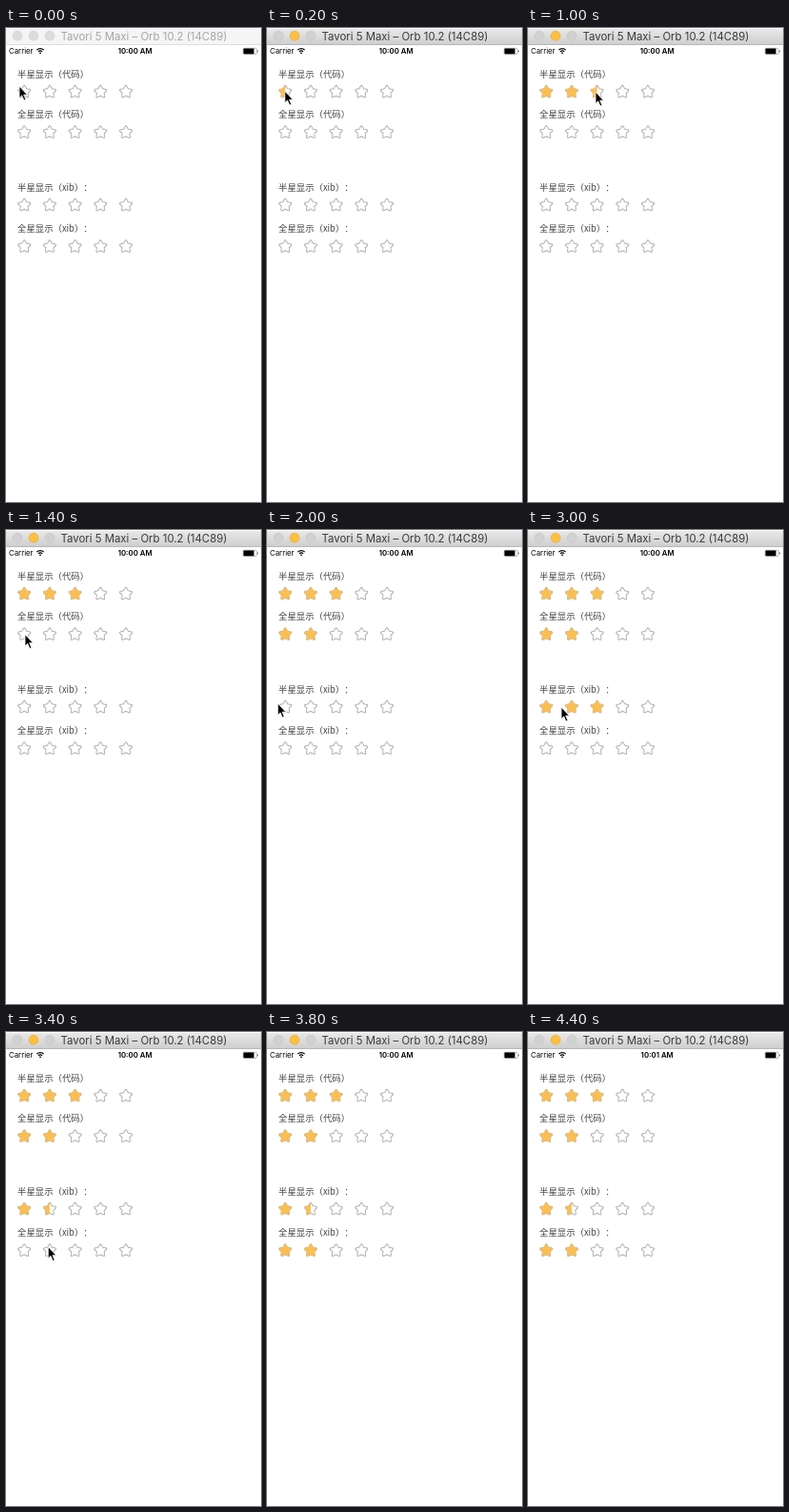
Recreate the animation shown at these times as an HTML page. Size 268x498 px, loop 4.8 s.

```html
<!DOCTYPE html>
<html lang="zh-CN">
<head>
<meta charset="utf-8">
<title>Star rating</title>
<style>
  html, body { margin: 0; width: 100%; height: 100%; overflow: hidden; background: #fff; }
  svg { display: block; width: 268px; height: 498px; }
  text { font-family: Inter, Roboto, sans-serif; }
  .title { font-size: 11.4px; text-anchor: middle; }
  .label { font: 300 9.4px "Noto Sans CJK SC", "Noto Sans CJK", sans-serif; fill: #444; text-spacing-trim: space-all; }
  .status { font-size: 7.8px; }
</style>
</head>
<body>
<svg viewBox="0 0 268 498">
  <defs>
    <linearGradient id="bar" x2="0" y2="1">
      <stop stop-color="#e9e8e9"/><stop offset="1" stop-color="#d0cfd0"/>
    </linearGradient>
    <clipPath id="left"><rect x="-9" y="-9" width="9" height="18"/></clipPath>
  </defs>
  <rect width="268" height="498" fill="#fff"/>
  <rect id="top" y="1" width="268" height="16"/>
  <rect id="edge" y="17" width="268" height="1"/>
  <g id="lights" stroke-width=".6">
    <circle cx="12" cy="8.2" r="5"/><circle cx="29" cy="8.2" r="5"/><circle cx="46" cy="8.2" r="5"/>
  </g>
  <text class="title" id="title" x="145" y="12.8">Tavori 5 Maxi – Orb 10.2 (14C89)</text>

  <text class="status" x="3" y="27.3">Carrier</text>
  <g fill="none" stroke="#000" stroke-width="1.2">
    <path d="M32.3 23.2a5.2 5.2 0 0 1 7.4 0M33.9 24.9a3 3 0 0 1 4.2 0"/>
    <path d="M36 27.4l-1.2-1.3a1.7 1.7 0 0 1 2.4 0z" fill="#000" stroke="none"/>
  </g>
  <text class="status" id="clock" x="135.7" y="27.3" font-weight="600" text-anchor="middle"></text>
  <rect x="249.3" y="21.3" width="14" height="6.2" rx="1" fill="none" stroke="#777" stroke-width=".5"/>
  <rect x="249.6" y="21.6" width="11" height="5.6" rx=".6"/>
  <path d="M264 23.2a1.3 1.3 0 0 1 0 2.4z" fill="#444"/>

  <g id="rows"></g>
  <path id="cursor" d="M0 0V12.3L2.7 9.7L4.9 14.8L6.9 14L4.7 9H8.5Z" stroke="#fff" stroke-width=".8" stroke-linejoin="round"/>
</svg>
<script>
const LOOP = 4800, STEP = 200, EXIT = 18, CLOCK = 22;
const $ = id => document.getElementById(id);

// from: first step with the pointer on this row; lift: how far above it enters;
// path: pointer x at each step; rates: rating at each step, the last one stays
const ROWS = [
  { label: "半星显示（代码）", y: 67.2, from: 0, lift: 6,
    path: [14, 18.8, 36, 71, 61, 71, 56], rates: [0, .5, .5, 1, 1, 2.5, 3] },
  { label: "全星显示（代码）", y: 109.7, from: 7, lift: 0,
    path: [20, 21, 42], rates: [0, 1, 1, 2] },
  { label: "半星显示（xib）：", y: 186.2, from: 10, lift: 4,
    path: [11.3, 19.5, 58, 63.5, 68, 35], rates: [0, .5, .5, 2, 3, 3, 1.5] },
  { label: "全星显示（xib）：", y: 229.7, from: 16, lift: 27,
    path: [57, 44.3], rates: [0, 0, 2] }
];

const points = Array.from({ length: 10 }, (_, i) => {
  const a = i * Math.PI / 5, r = i % 2 ? 3.3 : 6.1;
  return `${(r * Math.sin(a)).toFixed(2)},${(-r * Math.cos(a)).toFixed(2)}`;
}).join(" ");
const star = (color, width, extra = "") =>
  `<polygon points="${points}" fill="${color}" stroke="${color}" stroke-width="${width}" stroke-linejoin="round" ${extra}/>`;

$("rows").innerHTML = ROWS.map(({ label, y }) =>
  `<text class="label" x="12" y="${y - 15.3}">${label}</text>` +
  [0, 1, 2, 3, 4].map(i =>
    `<g transform="translate(${19.2 + i * 26.7} ${y})">${star("#a9a9a9", 2.5)}${star("#fff", .7)}${star("#f9bf55", 1.9, 'class="fill"')}</g>`
  ).join("")).join("");
const fills = [...document.querySelectorAll(".fill")];

function setWindow(active) {
  $("top").setAttribute("fill", active ? "url(#bar)" : "#f5f5f5");
  $("edge").setAttribute("fill", active ? "#b9b8b9" : "#dedede");
  $("title").setAttribute("fill", active ? "#3a3a3a" : "#a6a6a6");
  [...$("lights").children].forEach((c, i) => {
    const lit = active && i === 1;
    c.setAttribute("fill", lit ? "#fdbf41" : active ? "#d2d1d2" : "#dcdcdc");
    c.setAttribute("stroke", lit ? "#e5a935" : active ? "#c4c3c4" : "#d0d0d0");
  });
}

function pointer(step) {
  if (step === EXIT) return [241, 265];
  const { from, path, y, lift } = ROWS.findLast(r => r.from <= step);
  const k = step - from;
  return [path[k], y - lift * .15 ** k];
}

function rating({ from, rates }, step) {
  return step < from ? 0 : rates[Math.min(step - from, rates.length - 1)];
}

function draw(t) {
  const step = Math.floor(t / STEP);
  setWindow(step > 0);
  $("clock").textContent = step < CLOCK ? "10:00 AM" : "10:01 AM";
  $("cursor").setAttribute("visibility", step > EXIT ? "hidden" : "visible");
  if (step <= EXIT) $("cursor").setAttribute("transform", `translate(${pointer(step)})`);
  fills.forEach((f, i) => {
    const part = rating(ROWS[Math.floor(i / 5)], step) - i % 5;
    f.setAttribute("visibility", part > 0 ? "visible" : "hidden");
    f.setAttribute("clip-path", part === .5 ? "url(#left)" : "none");
  });
}

const start = performance.now();
function tick(now) {
  draw(Math.max(0, now - start) % LOOP);
  requestAnimationFrame(tick);
}
draw(0);
requestAnimationFrame(tick);
</script>
</body>
</html>
```
